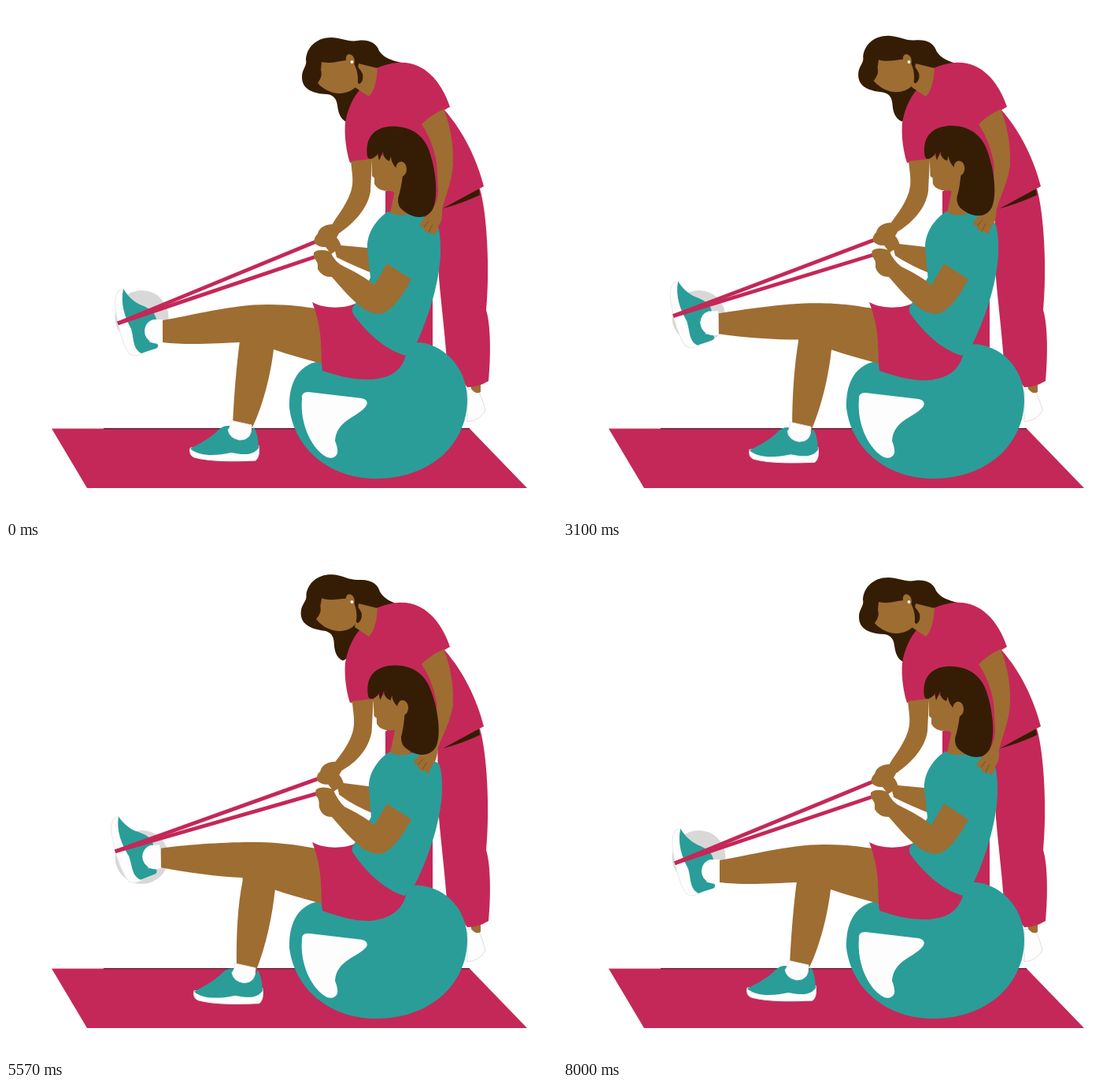
These frames come from a looping animation (700 by 650 pixels, 8030 ms). An HTML page with a canvas:

```html
<!DOCTYPE html>
<html lang="en">
<head>
<meta charset="utf-8">
<title>Assisted leg raise</title>
<style>
html, body { margin: 0; width: 100%; height: 100%; overflow: hidden; background: #fff; }
canvas { display: block; }
</style>
</head>
<body>
<canvas id="stage" width="700" height="650"></canvas>
<script>
const ctx = document.getElementById('stage').getContext('2d');
const TEAL = '#2a9d99', PINK = '#c42858', SKIN = '#9e6d32', HAIR = '#351d05',
      WHITE = '#fdfdfd', SHADE = '#d8d8d8', EDGE = '#e9e9e9';
const CYCLE = 4015;

function fill(color, d, edge) {
  const path = new Path2D(d);
  ctx.fillStyle = color;
  ctx.fill(path);
  if (edge) {
    ctx.strokeStyle = edge;
    ctx.lineWidth = 1;
    ctx.stroke(path);
  }
}

function disc(color, x, y, rx, ry = rx) {
  ctx.fillStyle = color;
  ctx.beginPath();
  ctx.ellipse(x, y, rx, ry, 0, 0, 2 * Math.PI);
  ctx.fill();
}

function line(color, width, x1, y1, x2, y2) {
  ctx.strokeStyle = color;
  ctx.lineWidth = width;
  ctx.beginPath();
  ctx.moveTo(x1, y1);
  ctx.lineTo(x2, y2);
  ctx.stroke();
}

// Draw a part shifted by (dx, dy) and turned around (x, y).
function posed(x, y, degrees, dx, dy, part) {
  ctx.save();
  ctx.translate(x + dx, y + dy);
  ctx.rotate(degrees * Math.PI / 180);
  ctx.translate(-x, -y);
  part();
  ctx.restore();
}

const wave = (t, peak) => (1 + Math.cos(2 * Math.PI * (t - peak) / CYCLE)) / 2;

function mat() {
  fill(PINK, 'M58 536.5H589L662 612H103Z');
  line('#3a1020', 1, 124, 536.5, 589, 536.5);
}

function therapistHair(s) {
  posed(450, 82, 5 * s, -s, -s, () => {
    fill(HAIR, 'M376 90C376 80 383 76 381 68C382 52 395 40 413 40C426 40 434 46 447 44C462 42 471 48 474 57C480 66 490 69 502 72L478 90L456 110C446 124 444 144 434 148C424 144 422 134 421 126C420 118 416 113 408 112C388 111 376 105 376 90Z');
  });
}

function therapistBody() {
  fill(WHITE, 'M586 486L600 488Q606 500 609 513Q603 526 586 528Z', '#dedede');
  fill(SKIN, 'M590 480L603 480L603 490Q597 494 591 486Z');
  fill(PINK, 'M482 235H542V440H482Z');
  fill(PINK, 'M548 250L602 232C611 262 615 335 610 386C616 405 616 445 613 476Q600 484 586 484L560 450C557 410 553 380 550 345Z');
  fill(PINK, 'M450 106L468 98L470 79Q485 73 497 72C528 69 552 92 564 128L557 132C582 160 599 197 607 229L552 258L482 262L484 235L466 196L437 199C431 180 429 155 432 143C436 125 444 112 450 106Z');
  fill(HAIR, 'M601 232L602 240Q578 251 555 257Z');
}

function therapistFace(s) {
  fill(SKIN, 'M448 73L472 79C471 95 468 108 461 115L443 103Z');
  posed(450, 82, 5 * s, -s, -s, () => {
    fill(HAIR, 'M441 72Q448 77 453 86Q455 95 449 99Q443 96 441 72Z');
    fill(SKIN, 'M401 71C412 74 422 70 432 69L442 73C447 82 449 96 445 102C434 114 412 115 396 98C400 92 402 88 400 81Z');
  });
  fill(SKIN, 'M433 73C429 62 436 58 441 64Q444 69 442 75Z');
  disc('#f3f0ea', 439.5, 71, 2);
}

function ball(s) {
  const top = 427 + 4 * s;
  fill(TEAL, `M394 452C369 458 359 482 360 510C366 561 410 600 470 600C540 600 586 555 586 500C586 456 552 ${top} 521 ${top}L480 435Z`);
  const y = 490 + 2 * s;
  fill(WHITE, `M376 ${y + 8}Q375 ${y} 384 ${y}L452 ${y + 8}Q461 ${y + 10} 458 ${y + 17}C448 522 420 525 418 552Q422 562 421 568Q417 576 408 573C390 564 373 533 376 ${y + 8}Z`);
}

function standingLeg(p, s) {
  const x = 6 * p, y = 4 * s;
  fill(SKIN, `M${297 + 4 * s} 415L${340 + 2 * s} 425V436C${336 + 3 * p} 470 ${326 + 5 * p} 508 ${313 + x} ${535 + y}L${288 + x} ${530 + y}C${290 + 3 * p} 490 ${293 + 2 * p} 455 ${297 + 4 * s} 425Z`);
  posed(0, 0, 0, x, y, () => {
    fill(WHITE, 'M234 561Q232 570 239 573C260 579 295 578 317 577Q323 572 321 558Z', EDGE);
    fill(TEAL, 'M234 562C247 555 262 547 270 538Q276 532 284 533L312 541Q313 536 315 535Q320 542 321 561C314 571 302 570 286 567C264 572 244 571 234 562Z');
    fill(WHITE, 'M285 526L312 532Q313 551 297 551Q284 549 282 538Q286 534 285 526Z', EDGE);
  });
}

function raisedLeg(q) {
  const x = 199 - 2 * q, top = 399 - 15.5 * q, low = 427 - 19 * q;
  fill(SKIN, `M${x} ${top}C${235 - 8 * q} ${393 - 14 * q} ${292 - 8 * q} ${378 - 3 * q} ${335 - 12 * q} ${379 - 3 * q}C360 ${379 - 2 * q} 380 382 394 384L412 400V457L404 455C380 448 360 443 340 436L${297 + 3 * q} ${427 - 6 * q}C270 ${428 - 8 * q} 230 ${431 - 17 * q} ${x} ${low}Z`);
}

function raisedFoot() {
  fill(WHITE, 'M149 359C139 360 138 372 139 383C142 405 146 425 156 441Q163 447 174 441L160 395Z', EDGE);
  fill(TEAL, 'M149 359C154 367 160 374 170 379C180 383 189 387 191 398L182 427Q192 427 193 430Q194 434 190 435Q180 438 172 441C161 435 163 424 159 410C151 395 145 378 149 359Z');
  fill(WHITE, 'M199 398V428Q191 430 185 427Q176 422 176 412Q177 401 187 398Z');
}

function patientBody(s) {
  fill(PINK, `M389 376C405 385 430 384 443 378L509 440C504 462 490 472 465 ${474 + 2 * s}C440 ${475 + 2 * s} 420 469 402 463C399 440 404 415 389 376Z`);
  posed(500, 345, 1.8 * s, s, 0, () => {
    fill(TEAL, 'M485 261C466 274 458 293 459 308L463 345L446 375Q437 384 441 391C456 412 480 436 508 444L521 429C535 400 552 350 552 310C552 292 550 281 547 275L520 262Q500 264 485 261Z');
  });
  fill(SKIN, 'M496 225L514 240L513 264Q499 268 488 262Z');
}

function therapistArm(s) {
  fill(SKIN, 'M528 150Q540 138 556 131C566 155 570 185 567 207L549 213C547 190 540 168 528 150Z');
  posed(560, 203, 6.5 * s, 0, 0, () => {
    fill(SKIN, 'M547 195L568 198C567 225 557 243 554 260Q555 274 549 280L546 290Q542 291 541 287Q538 291 535 287Q531 287 531 281Q525 282 526 276L536 264Q548 255 549 235Z');
    ctx.strokeStyle = '#805522';
    ctx.lineWidth = 1;
    ctx.stroke(new Path2D('M531 281L537 273M537 287L542 277'));
  });
}

function patientHead(s) {
  posed(485, 165, -3.2 * s, 0, -s, () => {
    fill(SKIN, 'M465 190V213Q464 217 468 218V226Q473 236 490 235L500 240L508 240L513 190Z');
    fill(HAIR, 'M459 191C456 169 466 155 487 153C514 151 533 165 539 188C547 213 549 244 542 258C534 272 517 270 505 260Q497 255 498 244Q502 232 504 215L495 205Q489 198 489 191L487 197Q479 194 479 185L474 196Q472 191 473 187Q467 195 461 194Z');
    disc(SKIN, 502, 207, 7, 9.5);
    fill(SKIN, 'M489 200L500 214L499 229L488 231Z');
  });
}

function straps(q, turn, p) {
  // The strap stays looped over the sole as the foot pivots.
  const a = turn * Math.PI / 180;
  const x = 189 - 3 * q - 47 * Math.cos(a) + 7 * Math.sin(a);
  const y = 410 - 18.5 * q - 47 * Math.sin(a) - 7 * Math.cos(a);
  line(PINK, 4.8, x, y, 394 + 5 * p, 299 - 5 * p);
  line(PINK, 4.8, x, y, 394 + 3 * p, 318 - 5 * p);
}

function backArm(p) {
  const x = 4 * p, y = -4 * p;
  fill(SKIN, `M${416 + x} ${303 + y}L470 ${308 - 2 * p}V341Q442 330 ${420 + x} ${319 + y}Z`);
}

function arms(p) {
  const x = 4 * p, y = -4 * p;
  fill(SKIN, `M${438 + 2 * p} 197C${440 + 2 * p} 215 ${442 + 2 * p} 224 ${438 + 3 * p} 236C${431 + x} 256 ${419 + x} 268 ${413 + x} ${280 + y}L${424 + x} ${288 + y}C${444 + 3 * p} 274 ${460 + 2 * p} 256 ${463 + 2 * p} 235L${465 + 2 * p} 194Z`);
  posed(0, 0, 0, x, y, () =>
    fill(SKIN, 'M414 277C403 278 398 282 396 289Q390 295 392 301Q398 307 406 306L413 315L426 306Q424 298 420 294L424 287Z'));
  fill(SKIN, `M${391 + 3 * p} ${313 + y}Q${398 + 3 * p} ${307 + y} ${412 + x} ${312 + y}Q${418 + x} ${326 + y} 430 331C445 338 458 346 468 354L484 327L515 347C505 366 492 385 479 390Q468 393 455 385C440 374 426 358 414 344Q401 344 ${396 + 2 * p} ${334 + y}Q${397 + 2 * p} ${324 + y} ${391 + 3 * p} ${320 + y}Z`);
}

function render(now) {
  const t = now % (2 * CYCLE);
  const p = wave(t, 2110);                                // trunk and arms
  const q = Math.sin(Math.PI / 2 * wave(t, 1950));        // leg leads
  const s = (p + q) / 2;
  const turn = -22 * (q - p);

  ctx.fillStyle = '#fff';
  ctx.fillRect(0, 0, 700, 650);
  mat();
  therapistHair(s);
  therapistBody();
  therapistFace(s);
  ball(s);
  disc(SHADE, 172.5, 395, 34);
  standingLeg(p, s);
  raisedLeg(q);
  posed(190, 410, turn, -3 * q, -18.5 * q, raisedFoot);
  backArm(p);
  patientBody(s);
  therapistArm(s);
  patientHead(s);
  straps(q, turn, p);
  arms(p);
  requestAnimationFrame(render);
}
requestAnimationFrame(render);
</script>
</body>
</html>
```
